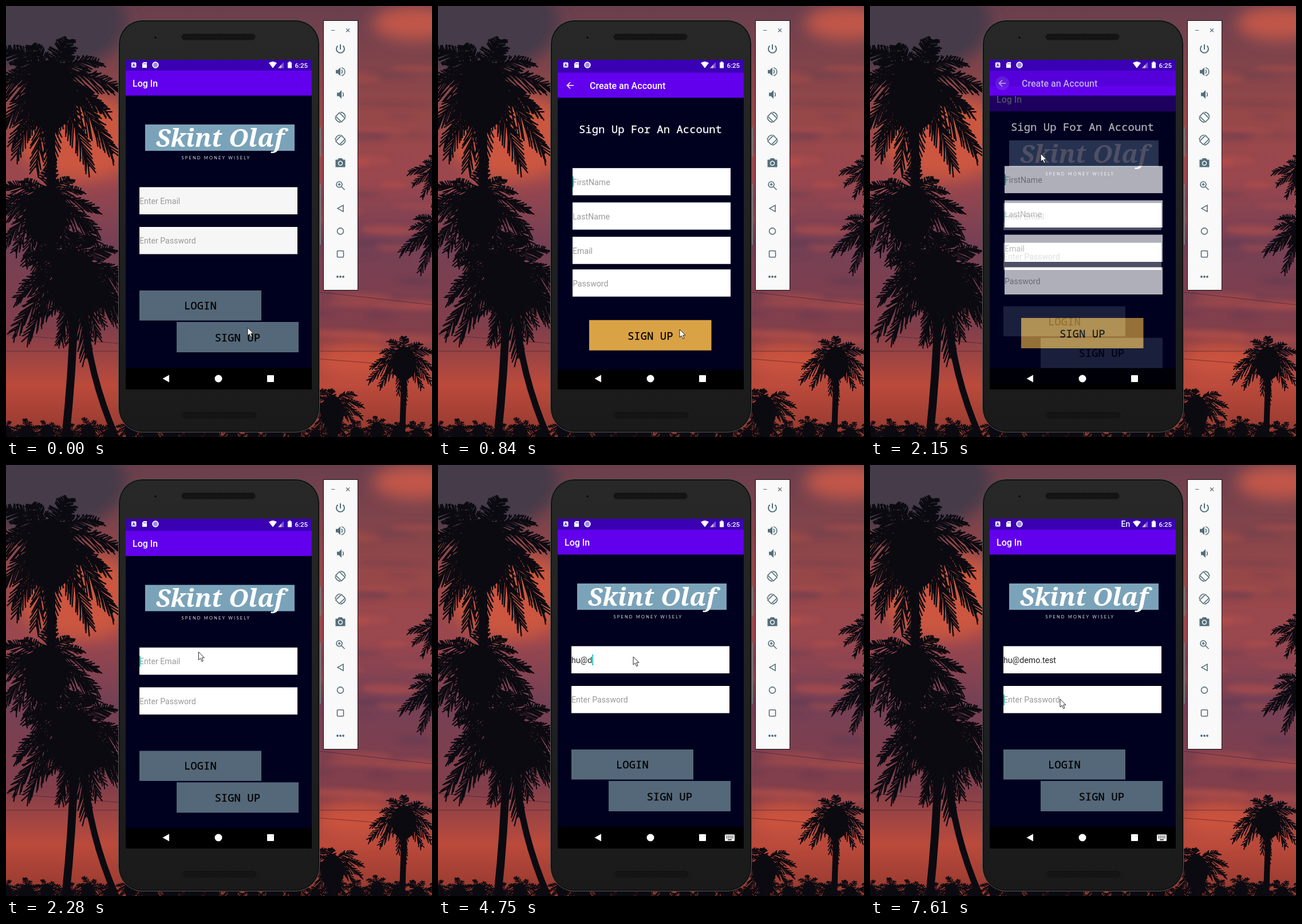
Write an HTML page that moves like this. It is 744 px wide and 753 px high and loops after 8 s.

```html
<!DOCTYPE html>
<html lang="en">
<head>
<meta charset="utf-8">
<title>Log in demo</title>
<style>
  html, body { margin: 0; width: 100%; height: 100%; overflow: hidden; background: #000; }
  svg { display: block; width: 100%; height: 100%; }
  text { font-family: Roboto, sans-serif; }
  .title { font-size: 16px; font-weight: 500; fill: #fff; }
  .hint, .typed { font-size: 14.15px; fill: #999; }
  .typed { fill: #222; }
  .mono { font-family: "Noto Sans Mono", monospace; font-size: 18.95px; stroke: #000; stroke-width: .3; }
  .mono.light { fill: #fff; stroke: #fff; }
  .caret { fill: #14c3b4; }
  .field { fill: #fff; }
  .early .field { fill: #f6f6f6; }
  .button { fill: #546879; }
  .line { fill: none; stroke: #546e7a; stroke-width: 1.6; }
  .solid { fill: #546e7a; }
</style>
</head>
<body>
<svg viewBox="0 0 744 753">
  <defs>
    <linearGradient id="sky" x2="0" y2="1">
      <stop offset="0" stop-color="#693f4d"/>
      <stop offset=".25" stop-color="#964849"/>
      <stop offset=".4" stop-color="#9b474e"/>
      <stop offset=".55" stop-color="#754055"/>
      <stop offset=".75" stop-color="#823f4b"/>
      <stop offset=".88" stop-color="#bb4a3b"/>
      <stop offset="1" stop-color="#93382f"/>
    </linearGradient>
    <linearGradient id="body" x2="0" y2="1">
      <stop offset="0" stop-color="#282828"/>
      <stop offset="1" stop-color="#1a1a1a"/>
    </linearGradient>
    <pattern id="mesh" width="3" height="3" patternUnits="userSpaceOnUse">
      <rect width="3" height="3" fill="#101010"/><circle cx="1.5" cy="1.5" r=".7" fill="#2b2b2b"/>
    </pattern>
    <filter id="soft" x="-50%" y="-50%" width="200%" height="200%"><feGaussianBlur stdDeviation="14"/></filter>
    <filter id="haze" x="-50%" y="-100%" width="200%" height="300%"><feGaussianBlur stdDeviation="4"/></filter>
    <clipPath id="display"><rect x="209" y="94" width="325" height="576"/></clipPath>
  </defs>

  <rect width="744" height="753" fill="url(#sky)"/>
  <g filter="url(#soft)">
    <ellipse cx="60" cy="30" rx="150" ry="90" fill="#443a4a"/>
    <ellipse cx="130" cy="230" rx="110" ry="75" fill="#cc573f"/>
    <ellipse cx="715" cy="30" rx="75" ry="30" fill="#c2574a"/>
    <ellipse cx="610" cy="620" rx="70" ry="30" fill="#cb523c"/>
  </g>
  <g id="streaks" filter="url(#haze)"></g>
  <path d="M0 574L744 632M0 603H744M548 500L744 522" stroke="#3b2230" fill="none" opacity=".6"/>
  <g id="palms" fill="#0b0a10" stroke="#0b0a10" stroke-linecap="round"></g>

  <!-- phone -->
  <path d="M548.500 212V263M548.500 310V417" stroke="#77777a" stroke-width="3"/>
  <rect x="196.500" y="24.500" width="351" height="720" rx="42" fill="#111" stroke="#555"/>
  <rect x="199" y="27" width="346" height="715" rx="39" fill="url(#body)"/>
  <rect x="307" y="49" width="128" height="10" rx="5" fill="url(#mesh)" stroke="#111"/>
  <rect x="308" y="710" width="129" height="10" rx="5" fill="url(#mesh)" stroke="#111"/>
  <circle cx="261" cy="55" r="3" fill="#101010" stroke="#333"/>

  <g clip-path="url(#display)">
    <rect x="209" y="94" width="325" height="576"/>
    <g id="stack">
      <g id="login"></g>
      <g id="signup"></g>
    </g>

    <!-- status bar -->
    <g fill="#fff">
      <rect x="219" y="98.500" width="8.500" height="9" rx="1.500"/>
      <path d="M221 106L223.200 100.500L225.400 106M222 104.200H224.500" fill="none" stroke="#3a00b3"/>
      <path d="M240.500 98H246V108H238V100.500Z"/>
      <path d="M240.500 101H245" stroke="#3a00b3" stroke-width="2" stroke-dasharray=".7 1.1"/>
      <circle cx="261" cy="103" r="4.800" fill="#9a8ce0" stroke="#fff" stroke-width="1.800"/>
      <text id="lang" x="438.500" y="108" style="font-size:14px;font-weight:500">En</text>
      <path d="M459 99.500Q466 94.500 473 99.500L466 108.500Z"/>
      <path d="M475 108.500L485 98V108.500Z" opacity=".35"/>
      <path d="M475 108.500L481 102.200V108.500Z" opacity=".6"/>
      <path d="M492 98.500H494V97H497V98.500H499V108.500H492Z"/>
      <text x="504.500" y="107.500" style="font-size:11.5px;font-weight:500">6:25</text>
    </g>
    <!-- navigation bar -->
    <g fill="#fff">
      <path d="M273.500 651L285 644.500V657.500Z"/>
      <circle cx="371" cy="651" r="6.500"/>
      <rect x="456" y="645" width="12" height="12" rx="1"/>
      <g id="keyboard">
        <rect x="501" y="645.500" width="17" height="11.500" rx="1.500"/>
        <path d="M503.500 648.500H516M503.500 651.500H516" stroke="#000" stroke-width="1.600" stroke-dasharray="1.600 1.100"/>
        <path d="M506 654.700H513" stroke="#000" stroke-width="1.400"/>
      </g>
    </g>
  </g>

  <!-- emulator toolbar -->
  <rect x="554.500" y="25.500" width="60" height="471" fill="#f9f9f9" stroke="#111"/>
  <path d="M568 42.500H574.500M594 39.500L600 45.500M600 39.500L594 45.500" class="line" style="stroke-width:1.1"/>
  <g id="tools">
    <g><path class="line" d="M0-8V1M-4.500-5.500A7 7 0 1 0 4.500-5.500" style="stroke-width:2"/></g>
    <g><path class="solid" d="M-8-3H-4.500L0-7.500V7.500L-4.500 3H-8Z"/><path class="line" d="M2-3.500Q4.500 0 2 3.500M2-7A7.100 7.100 0 0 1 2 7"/></g>
    <g><path class="solid" d="M-6-3H-2.500L2-7.500V7.500L-2.500 3H-6Z"/><path class="line" d="M4-3.500Q6.500 0 4 3.500"/></g>
    <g id="rotate"><rect class="line" x="-4.500" y="-7" width="9" height="14" transform="rotate(-45)"/><path class="line" d="M0-9Q8-8 9 0M-9 0Q-8 7 0 9"/></g>
    <g><use href="#rotateBack"/></g>
    <g><path class="solid" d="M-8.500-5.500H-4.500L-3-8H3L4.500-5.500H8.500V7.500H-8.500Z"/><circle r="3.500" cy=".8" fill="#546e7a" stroke="#f9f9f9" stroke-width="1.500"/></g>
    <g><circle class="line" cx="-2" cy="-2" r="5"/><path class="line" d="M2 2L7.500 7.500M-4.500-2H.5M-2-4.500V.5"/></g>
    <g><path class="line" d="M-5 0L5-5.500V5.500Z"/></g>
    <g><circle class="line" r="5.500"/></g>
    <g><rect class="line" x="-5.500" y="-5.500" width="11" height="11" rx="1"/></g>
    <g><path class="line" d="M-5 0H5.100" stroke-linecap="round" stroke-dasharray="0 5" style="stroke-width:3.8"/></g>
  </g>
  <defs>
    <g id="rotateBack" transform="scale(-1 1)"><rect class="line" x="-4.500" y="-7" width="9" height="14" transform="rotate(-45)"/><path class="line" d="M0-9Q8-8 9 0M-9 0Q-8 7 0 9"/></g>
  </defs>

  <path id="pointer" d="M0 0V14L3.300 11L5.600 16.500L8 15.500L5.700 10.200H10Z" fill="#fff" stroke="#111" stroke-width=".9"/>
</svg>
<script>
const $ = id => document.getElementById(id);

// ---- scenery ----
let seed = 7;
const random = (lo, hi) => {
  seed = (seed * 16807) % 2147483647;
  return lo + (hi - lo) * seed / 2147483647;
};

for (let i = 0; i < 34; i++) {
  const color = i % 2 ? "#c9564a" : "#5a3a50";
  $("streaks").innerHTML += `<ellipse cx="${random(550, 744)}" cy="${random(20, 560)}" rx="${random(25, 70)}"
    ry="${random(3, 9)}" fill="${color}" opacity="${random(.2, .5)}" transform="rotate(2)"/>`;
}

function frond(x, y, angle, length) {
  const dx = Math.cos(angle) * length, dy = Math.sin(angle) * length, sag = length * .45;
  let d = `M${x} ${y}q${dx / 2} ${dy / 2} ${dx} ${dy + sag}`;
  for (let u = .08; u <= 1; u += 4.5 / length) {
    const leaf = length * .34 * (1.1 - u * .75);
    for (const side of [-.6, .6]) {
      const a = angle + side + random(-.2, .2);
      d += `M${x + dx * u} ${y + dy * u + sag * u * u}l${Math.cos(a) * leaf} ${(Math.sin(a) + .6) * leaf}`;
    }
  }
  return d;
}

function palm(x, y, radius, footX, footY) {
  const count = 8 + Math.round(radius / 12);
  let fronds = "";
  for (let i = 0; i < count; i++)
    fronds += frond(x, y, i / count * 2 * Math.PI + random(-.2, .2), radius * random(.75, 1.1));
  $("palms").innerHTML += `
    <ellipse cx="${x}" cy="${y + radius * .25}" rx="${radius * .36}" ry="${radius * .5}"/>
    <path d="M${x} ${y}Q${x} ${(y + footY) / 2} ${footX} ${footY}" fill="none" stroke-width="${6 + radius / 14}"/>
    <path d="${fronds}" fill="none" stroke-width="${1.2 + radius / 110}"/>`;
}

palm(78, 125, 122, 80, 350);
palm(70, 340, 100, 90, 460);
palm(120, 455, 110, 104, 753);
palm(135, 490, 70, 192, 753);
palm(758, 285, 55, 770, 400);
palm(760, 385, 66, 770, 500);
palm(695, 610, 58, 692, 753);
palm(570, 695, 56, 565, 753);
for (let x = 0; x < 760; x += 36) palm(x, random(732, 748), random(20, 36), x, 760);

[...$("tools").children].forEach((tool, i) =>
  tool.setAttribute("transform", `translate(584 ${75 + 39.8 * i})`));

// ---- app screens ----
const box = (x, y, w, h, attrs) => `<rect x="${x}" y="${y}" width="${w}" height="${h}" ${attrs}/>`;
const text = (x, y, style, label, attrs = "") => `<text class="${style}" x="${x}" y="${y}" ${attrs}>${label}</text>`;
const field = (x, y, label, attrs) => box(x, y, 276, 47.5, 'class="field"') + text(x, y + 29.3, "hint", label, attrs);
const caret = (id, x, y) => box(x, y, 1.8, 19, `id="${id}" class="caret"`);
const chrome = (title, x) =>
  box(209, 60, 325, 572, 'fill="#00001f"') +
  box(209, 60, 325, 52.5, 'fill="#3a00b3"') +
  box(209, 112.5, 325, 44, 'fill="#6200ee"') +
  text(x, 141, "title", title);

$("login").innerHTML = chrome("Log In", 221) +
  box(243, 207, 261, 46, 'fill="#7aa3b9"') +
  text(374, 246, "", "Skint Olaf", `text-anchor="middle" fill="#fff" style="font:italic 600 44px 'Noto Serif',serif"`) +
  text(306.5, 268, "", "SPEND MONEY WISELY", 'fill="#ddd" style="font:7.4px Lato,sans-serif;letter-spacing:2.25px"') +
  field(233, 316.5, "Enter Email", 'id="email"') +
  field(233, 386, "Enter Password") +
  caret("emailCaret", 233, 331) + caret("passCaret", 233, 401) +
  box(233, 497, 213, 52.5, 'class="button"') + text(311, 530, "mono", "LOGIN") +
  box(298, 552, 213, 53, 'class="button"') + text(364.5, 585.5, "mono", "SIGN UP");

$("signup").innerHTML = chrome("Create an Account", 265) +
  '<circle id="ripple" cx="231" cy="135" r="12" fill="#fff" opacity=".15"/>' +
  '<path d="M237 135H226M231 129.5L225.500 135L231 140.500" fill="none" stroke="#fff" stroke-width="1.6"/>' +
  text(246, 218, "mono light", "Sign Up For An Account") +
  field(235, 279.5, "FirstName") + field(235, 339.5, "LastName") +
  field(235, 399.5, "Email") + field(235, 456.5, "Password") +
  caret("nameCaret", 235, 294) +
  box(264, 545, 213.5, 53, 'fill="#d9a345"') + text(331, 579, "mono", "SIGN UP");

// ---- timeline (ms) ----
const SIGNUP_OPENS = 600, LOGIN_RETURNS = 2150, PASSWORD_FOCUS = 7490;
const progress = (t, start, duration) => Math.min(1, Math.max(0, (t - start) / duration));
const easeOut = u => 1 - (1 - u) ** 3;
const blink = (t, since) => t >= since && (t - since) % 1000 < 500;
const show = (id, on) => $(id).setAttribute("visibility", on ? "visible" : "hidden");
const move = (id, x, y) => $(id).setAttribute("transform", `translate(${x} ${y})`);

const pointerMoves = [
  { start: 120, duration: 240, to: [422, 565] },
  { start: 950, duration: 200, to: [232, 139] },
  { start: 2060, duration: 340, to: [341, 335] },
  { start: 6850, duration: 390, to: [332, 409] }
];
const bursts = [
  { start: 3470, pace: 120, keys: "hu" },
  { start: 4350, pace: 0, keys: "@" },
  { start: 4750, pace: 185, keys: "demo.test" }
];

function pointerAt(t) {
  let [x, y] = [422, 562];
  for (const { start, duration, to } of pointerMoves) {
    const u = easeOut(progress(t, start, duration));
    x += (to[0] - x) * u;
    y += (to[1] - y) * u;
  }
  return [x, y];
}

function typingAt(t) {
  let typed = "", lastKey = LOGIN_RETURNS;
  for (const { start, pace, keys } of bursts)
    [...keys].forEach((key, i) => {
      if (t < start + i * pace) return;
      typed += key;
      lastKey = start + i * pace;
    });
  return { typed, lastKey };
}

function render(t) {
  const back = t >= LOGIN_RETURNS;
  const [over, under] = back ? ["login", "signup"] : ["signup", "login"];
  const u = back ? progress(t, LOGIN_RETURNS, 235) : progress(t, SIGNUP_OPENS, 520);
  if ($("stack").lastElementChild !== $(over)) $("stack").append($(over));
  move(over, 0, (back ? 28 : 24) * (1 - easeOut(u)));
  move(under, 0, 0);
  $(over).setAttribute("opacity", t < SIGNUP_OPENS ? 0 : Math.min(1, .3 + 2 * u));
  $(under).setAttribute("opacity", 1);
  $("login").setAttribute("class", back ? "" : "early");

  const { typed, lastKey } = typingAt(t);
  const email = $("email");
  email.textContent = typed || "Enter Email";
  email.setAttribute("class", typed ? "typed" : "hint");
  $("emailCaret").setAttribute("x", 233 + (typed ? email.getComputedTextLength() : 0));

  show("emailCaret", blink(t, back ? lastKey : 240) && t < PASSWORD_FOCUS);
  show("nameCaret", blink(t, 840) || t < 840);
  show("passCaret", blink(t, PASSWORD_FOCUS));
  show("ripple", t >= 1890);
  show("keyboard", typed);
  show("lang", t >= 7610);
  move("pointer", ...pointerAt(t));
}

function tick() {
  render(performance.now() % 8000);
  requestAnimationFrame(tick);
}
tick();
</script>
</body>
</html>
```
